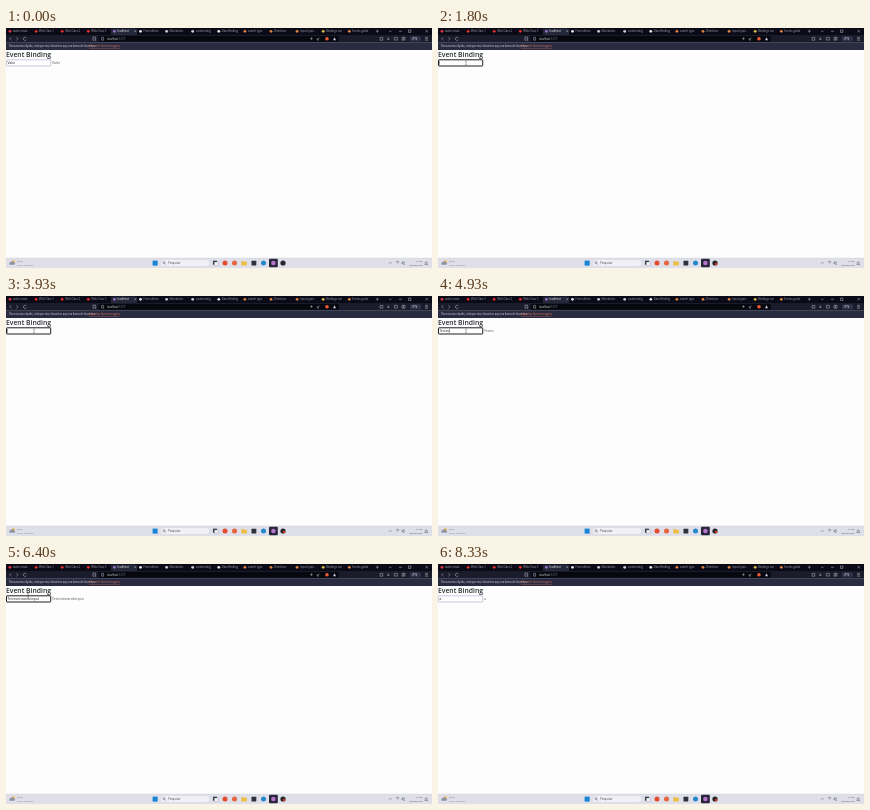
Animation, 426 px wide and 240 px high, one loop 8390 ms. Source, as an HTML page:

```html
<!DOCTYPE html>
<html lang="pt-BR">
<head>
<meta charset="utf-8">
<title>Event Binding</title>
<style>
html, body { margin: 0; width: 100%; height: 100%; overflow: hidden; background: #fdfdfe; }
svg { display: block; width: 100vw; height: 100vh; }
text { font: 3px "Open Sans", "Noto Sans", sans-serif; white-space: pre; }
.tab, .bar { font-size: 2.7px; }
.tab { fill: #a4a5b2; }
.bar { fill: #d6d7df; }
.tray { font-size: 2.5px; fill: #454650; }
.title { font-size: 6.8px; font-weight: 600; fill: #292b30; }
.value { font-size: 3.35px; fill: #25262a; }
.line { fill: none; stroke: #b9bac7; stroke-width: .5; }
.dark { fill: none; stroke: #4b4c58; stroke-width: .5; }
</style>
</head>
<body>
<svg id="stage" viewBox="0 0 426 240" preserveAspectRatio="none">
  <rect width="426" height="240" fill="#fdfdfe"/>

  <rect width="426" height="7" fill="#0b0b18"/>
  <rect y="7" width="426" height="7.3" fill="#1b1c2b"/>
  <rect y="14.2" width="426" height="7.8" fill="#292b40"/>
  <path d="M105 7V1.6q0-1 1-1h24q1 0 1 1V7z" fill="#25273a"/>
  <g id="tabs"></g>
  <path class="line" d="M369.8 3.2h3M371.3 1.7v3M383 2.6l1.3 1.3 1.3-1.3M393 3.3h3M402.5 2h2.4v2.4h-2.4zM419.5 2l2.4 2.4m0-2.4l-2.4 2.4"/>

  <path class="line" d="M5.3 9.2L3.7 10.8l1.6 1.6M10.4 9.2l1.6 1.6-1.6 1.6M20.2 9.8a1.6 1.6 0 1 0 .2 1.8M87 9h2.6v3.6l-1.3-1-1.3 1z"/>
  <rect x="92.5" y="7.9" width="240.5" height="5.8" rx="1.6" fill="#07080f"/>
  <path class="line" d="M95.6 9.4h2v2.8h-2z"/>
  <text class="bar" x="101" y="11.8">localhost<tspan fill="#858796">:5173</tspan></text>
  <path class="line" d="M304.2 10.6h2.6M305.5 9.3v2.6M311.3 12l2.2-2.4M311.3 10.2V12h1.7"/>
  <circle cx="321" cy="10.8" r="1.8" fill="#f05b32"/>
  <path d="M327 12.2l1.5-2.9 1.5 2.9z" fill="#c9c4d9"/>
  <path class="line" d="M374 9.4h2.8v2.8H374zM382.3 9v3m-1.2-1.2l1.2 1.2 1.2-1.2M388.3 9.3h3v2.8h-3zM396 9.3h3v2.8h-3zM397.5 9.3v2.8M419 9.4h3M419 10.8h3M419 12.2h3"/>
  <rect x="404" y="8.3" width="11" height="5" rx="1" fill="#30324a"/>
  <text class="bar" x="406" y="11.8">VPN</text>

  <text class="bar" x="3" y="19" textLength="">Para acesso rápido, coloque seus favoritos aqui na barra de favoritos.</text>
  <text class="bar" x="83" y="19" style="fill:#e0715e" id="link">Importar favoritos agora</text>

  <text class="title" x="0" y="29.3">Event Binding</text>
  <rect id="field" x=".5" y="31.8" width="44.2" height="6.2" rx=".5" fill="#fff"/>
  <text class="value" x="1.4" y="36" id="typed"></text>
  <rect id="caret" y="32.8" width=".4" height="4" fill="#111"/>
  <text class="value" x="46" y="36" id="echo" style="fill:#55565a"></text>

  <rect y="230" width="426" height="10" fill="#dedfe9"/>
  <path d="M0 230h426" stroke="#c9cad5" stroke-width=".4"/>
  <circle cx="7.4" cy="233.8" r="1.6" fill="#eeb13c"/>
  <path d="M4 236.8a1.3 1.3 0 0 1 .4-2.5 1.8 1.8 0 0 1 3.4.3 1.1 1.1 0 0 1 .4 2.2z" fill="#8c95a8"/>
  <text class="tray" x="11" y="234.2">20°C</text>
  <text class="tray" x="11" y="238" style="fill:#777985">Pred. nublado</text>
  <rect x="146.6" y="232.6" width="5" height="5" fill="#1685d8"/>
  <rect x="154.5" y="231.5" width="49" height="7" rx="3.5" fill="#f0f0f6" stroke="#c7c8d1" stroke-width=".3"/>
  <circle class="dark" cx="158" cy="234.7" r="1.1"/><path class="dark" d="M158.8 235.5l1.1 1.1"/>
  <text class="tray" x="162" y="236" style="font-size:2.8px">Pesquisar</text>
  <rect x="207" y="232.7" width="4" height="4" fill="#34363e"/>
  <rect x="208.4" y="234" width="3.6" height="3.6" fill="#f5f5f9" stroke="#777985" stroke-width=".3"/>
  <circle cx="219" cy="235" r="2.5" fill="#e44d2e"/>
  <circle cx="228.5" cy="235" r="2.5" fill="#e7653a"/>
  <path d="M235.4 233h2l.6.7h2.8v3.7h-5.4z" fill="#edbd3f"/>
  <rect x="245.5" y="232.7" width="4.8" height="4.8" rx=".5" fill="#30333d"/>
  <circle cx="257.5" cy="235" r="2.5" fill="#2787cd"/>
  <rect x="263" y="230.7" width="8.8" height="8.6" rx="1" fill="#292538"/>
  <circle cx="267.4" cy="235" r="2.3" fill="#b775cb"/>
  <circle cx="277" cy="235" r="2.6" fill="#25262b"/>
  <circle id="rec" cx="278.2" cy="236" r="1.3" fill="#d63a32"/>
  <path class="dark" d="M383 235.5l1.3-1.3 1.3 1.3M390 234q1.6-1.4 3.2 0M390.8 235q.8-.7 1.6 0M396 234.3h1l1-1v3.4l-1-1h-1zM418.8 236.5h2.8l-.5-.8v-1a.9.9 0 0 0-1.8 0v1z"/>
  <text class="tray" x="416.5" y="234.2" text-anchor="end">16:56</text>
  <text class="tray" x="416.5" y="238" text-anchor="end">08/08/2023</text>

  <g id="pointer">
    <path id="arrow" d="M0 0v3.5l.9-.8.6 1.3.6-.3-.6-1.2h1.1z" fill="#fff" stroke="#222" stroke-width=".35"/>
    <path id="beam" d="M-.7-1.8h1.4M0-1.8v3.6M-.7 1.8h1.4" fill="none" stroke="#333" stroke-width=".4"/>
  </g>
</svg>
<script>
const LOOP = 8390;
const $ = id => document.getElementById(id);
const el = Object.fromEntries(
  ["field", "typed", "caret", "echo", "rec", "pointer", "arrow", "beam"].map(id => [id, $(id)]));

const tabs = [
  ["aulas novas", "#df3542"], ["Web Class 1", "#e52c2c"], ["Web Class 2", "#e52c2c"],
  ["Web Class 3", "#e52c2c"], ["localhost", "#9a70ce"], ["Formulários", "#e5e5ec"],
  ["Notebooks", "#c9c9d2"], ["customizing", "#c9c9d2"], ["Data Binding", "#e5e5ec"],
  ["search type", "#d98240"], ["Directives", "#d98240"], ["input types", "#d98240"],
  ["Bindings con", "#dfba48"], ["Events guide", "#d98240"]
];

function add(tag, attrs, text = "") {
  const node = document.createElementNS("http://www.w3.org/2000/svg", tag);
  for (const key in attrs) node.setAttribute(key, attrs[key]);
  node.textContent = text;
  $("tabs").append(node);
}

tabs.forEach(([label, color], i) => {
  const x = 4 + i * 26.1, active = i === 4;
  add("circle", { cx: x, cy: 3.3, r: 1.4, fill: color });
  add("text", { class: "tab", x: x + 3, y: 4.3, style: active ? "fill:#fff" : "" }, label);
  if (active) add("path", { class: "line", d: `M${x + 20} 2.4l1.7 1.7m0-1.7l-1.7 1.7` });
});

$("link").setAttribute("text-decoration", "underline");

// start, end, text, whether it is being removed
const edits = [
  [0, 0, "Valor", false],
  [1540, 1800, "Valor", true],
  [1870, 2500, "Evento", false],
  [3270, 3800, "Evento", true],
  [4130, 4800, "Testes", false],
  [5000, 6270, "Testestestandoinput", false, 6],
  [6870, 7670, "Testestestandoinput", true],
  [7740, 7800, "a", false]
];

// time, x, y
const path = [
  [0, 280, 241], [870, 61.5, 27], [1130, 61.5, 27], [1480, 28, 35],
  [5470, 28, 35], [6070, 22, 31.3], [7600, 22, 31.3], [8250, 280, 241], [LOOP, 280, 241]
];

function valueAt(t) {
  const [start, end, text, removing, kept = 0] = edits.filter(e => e[0] <= t).pop();
  const p = end > start ? Math.min(1, (t - start) / (end - start)) : 1;
  const count = removing
    ? Math.ceil(text.length * (1 - p))
    : kept + Math.floor((text.length - kept) * p + 1e-6);
  return text.slice(0, count);
}

function pointAt(t) {
  const i = path.findIndex(p => p[0] > t);
  const [t0, x0, y0] = path[i - 1], [t1, x1, y1] = path[i];
  const p = (t - t0) / (t1 - t0), k = p * p * (3 - 2 * p);
  return [x0 + (x1 - x0) * k, y0 + (y1 - y0) * k];
}

function draw(now) {
  const t = now % LOOP;
  const value = valueAt(t);
  if (el.typed.textContent !== value) {
    el.typed.textContent = el.echo.textContent = value;
  }
  const focused = t >= 1500 && t < 8200;
  el.field.setAttribute("stroke", focused ? "#111216" : "#aaa7c6");
  el.field.setAttribute("stroke-width", focused ? .95 : .6);
  el.caret.setAttribute("x", 1.5 + (value ? el.typed.getComputedTextLength() : 0));
  el.caret.style.opacity = focused && (t - 1500) % 1060 < 530 || t > 3800 && t < 4130 ? 1 : 0;
  el.rec.style.opacity = t > 500 ? 1 : 0;

  const [x, y] = pointAt(t);
  const inside = x < 45 && y > 31 && y < 38;
  el.pointer.setAttribute("transform", `translate(${x} ${y})`);
  el.arrow.style.display = inside ? "none" : "";
  el.beam.style.display = inside ? "" : "none";
}

const begin = performance.now();
function tick() {
  draw(performance.now() - begin);
  requestAnimationFrame(tick);
}
tick();
</script>
</body>
</html>
```
